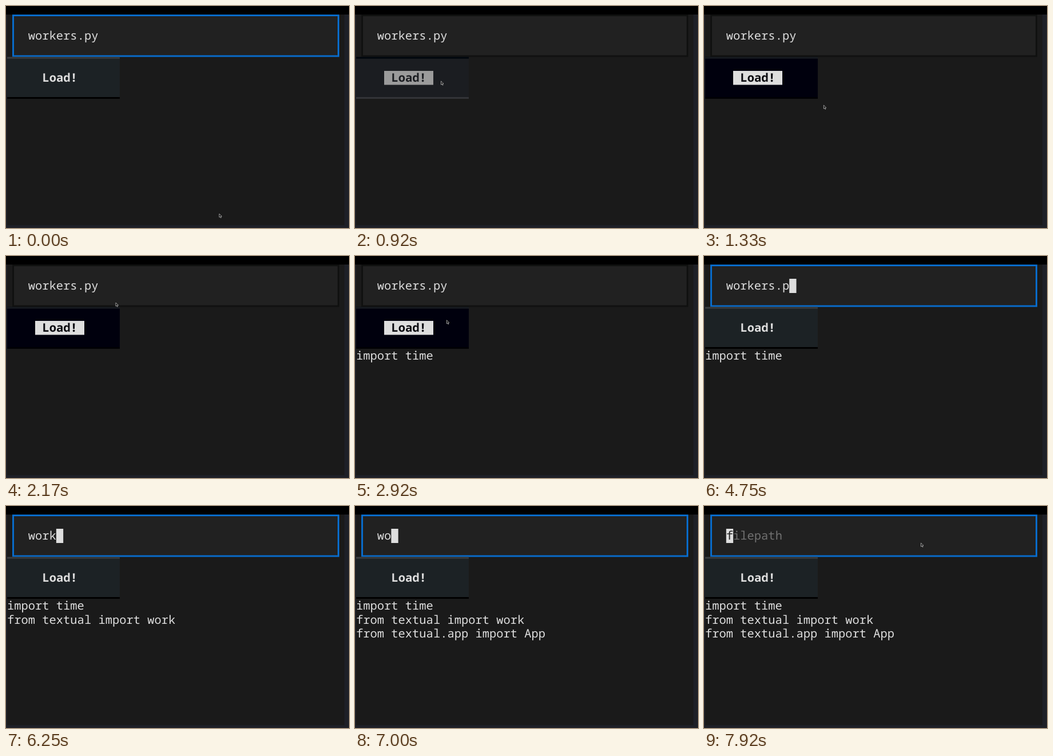
These frames come from a looping animation (600 by 390 pixels, 8010 ms). An HTML page:

```html
<!DOCTYPE html>
<html lang="en">
<head>
<meta charset="utf-8">
<title>File loader</title>
<style>
  html, body { margin: 0; width: 100%; height: 100%; overflow: hidden; background: #1e2027; }
  svg { display: block; }
  text {
    font: 20.45px "Noto Sans Mono", "DejaVu Sans Mono", monospace;
    text-rendering: geometricPrecision;
    fill: #dedede;
  }
  .bold { font-weight: 700; }
</style>
</head>
<body>
<svg width="600" height="390" viewBox="0 0 600 390">
  <rect width="600" height="390" fill="#1e2027"/>
  <rect x="2" y="15" width="590" height="370" fill="#1a1a1a"/>
  <rect width="600" height="15" fill="#000"/>

  <rect id="field" x="12.5" y="16.5" width="569" height="71.5" fill="#212121" stroke-width="3"/>
  <text id="value" x="38.8" y="59"></text>
  <rect id="caret" y="40" width="12.3" height="25" fill="#dedede"/>
  <text id="caretChar" x="38.8" y="59" style="fill:#212121">f</text>

  <rect id="face" x="2" y="89.5" width="197" height="73.5"/>
  <rect id="top" x="2" y="89.5" width="197" height="3"/>
  <rect id="bottom" x="2" y="160" width="197" height="3"/>
  <rect id="labelBox" x="51" y="114" width="86" height="24.5"/>
  <text id="label" class="bold" x="63.4" y="132.5">Load!</text>

  <g id="output">
    <text x="2" y="182">import time</text>
    <text x="2" y="206.7">from textual import work</text>
    <text x="2" y="231.4">from textual.app import App</text>
  </g>

  <path id="mouse" d="M0 0V6.2L1.5 5L2.5 7.2L3.6 6.7L2.7 4.6L4.5 4.4Z"
        fill="#111" stroke="#d0d0d0" stroke-width=".7"/>
</svg>
<script>
const LOOP = 8010, FPS = 12, LAST = 95;
const COL = 12.27, TEXT_X = 38.8;
const FILE = "workers.py", HINT = "filepath";

// All times below are ticks of 1/12 s.
const PRESS = 11, RELEASE = 13, REFOCUS = 48;
const BACKSPACES = [57, 61, 64, 68, 71, 75, 78, 84, 86, 90];
const LINES = [35, 59, 83];
const MOUSE_HIDDEN = [57, 93];
const MOUSE_PATH = [
  [0, 373, 365], [8, 150.5, 132], [12, 150.5, 132], [18, 230, 189],
  [22, 230, 189], [25, 194, 108], [26, 192, 82], [28, 172, 56],
  [32, 149.5, 109], [33, 149.5, 111], [34, 149.5, 111], [38, 219, 122],
  [42, 196, 105], [43, 200, 92], [44, 216, 51], [45, 215, 45],
  [46, 214.5, 41], [93, 216, 42], [94, 330, 73], [95, 379.5, 65]
];
const BUTTON = {
  normal: { face: "#1c2225", top: "#3a3d40", bottom: "#000", box: "#dedede" },
  hover:  { face: "#00000d", top: "#171b20", bottom: "#000004", box: "#dedede" },
  active: { face: "#1b1d21", top: "#00060d", bottom: "#333438", box: "#9b9b9b" }
};

const $ = id => document.getElementById(id);
const set = (id, attrs) => {
  for (const name in attrs) $(id).setAttribute(name, attrs[name]);
};
const show = (node, on) => { node.style.display = on ? "" : "none"; };
const within = (n, from, to) => n >= from && n < to;

function mouseAt(n) {
  const next = MOUSE_PATH.findIndex(p => p[0] >= n);
  if (next < 1) return MOUSE_PATH[0].slice(1);
  const [t0, x0, y0] = MOUSE_PATH[next - 1], [t1, x1, y1] = MOUSE_PATH[next];
  const k = (n - t0) / (t1 - t0), e = k * k * (3 - 2 * k);
  return [x0 + (x1 - x0) * e, y0 + (y1 - y0) * e];
}

// The button reacts one tick after the pointer.
function isHovered(n) {
  const [x, y] = mouseAt(n - 1);
  return x < 199 && y >= 89 && y < 163;
}

function drawField(n, focused) {
  const typed = FILE.slice(0, FILE.length - BACKSPACES.filter(t => n >= t).length);
  const caretOn = within(n, 5, PRESS) || within(n, REFOCUS, 54) || n >= BACKSPACES[0];
  set("field", { stroke: focused ? "#086bca" : "#101110" });
  $("value").textContent = typed || HINT;
  $("value").style.fill = typed ? "#dedede" : "#717171";
  set("caret", { x: TEXT_X + typed.length * COL });
  show($("caret"), caretOn);
  show($("caretChar"), !typed);
}

function drawButton(n, focused) {
  const look = BUTTON[within(n, PRESS, RELEASE) ? "active" : isHovered(n) ? "hover" : "normal"];
  set("face", { fill: look.face });
  set("top", { fill: look.top });
  set("bottom", { fill: look.bottom });
  set("labelBox", { fill: look.box });
  show($("labelBox"), focused);
  $("label").style.fill = focused ? (look === BUTTON.active ? "#1b1d21" : "#08080e") : "#dedede";
}

function draw(ms) {
  const n = Math.min(LAST, Math.floor((ms % LOOP + 5) * FPS / 1000));
  const buttonFocused = within(n, PRESS, REFOCUS);
  drawField(n, !buttonFocused);
  drawButton(n, buttonFocused);
  [...$("output").children].forEach((line, i) => show(line, n >= LINES[i]));
  set("mouse", { transform: `translate(${mouseAt(n)})` });
  show($("mouse"), !within(n, ...MOUSE_HIDDEN));
}

const start = performance.now();
function tick() {
  draw(performance.now() - start);
  requestAnimationFrame(tick);
}
tick();
</script>
</body>
</html>
```
